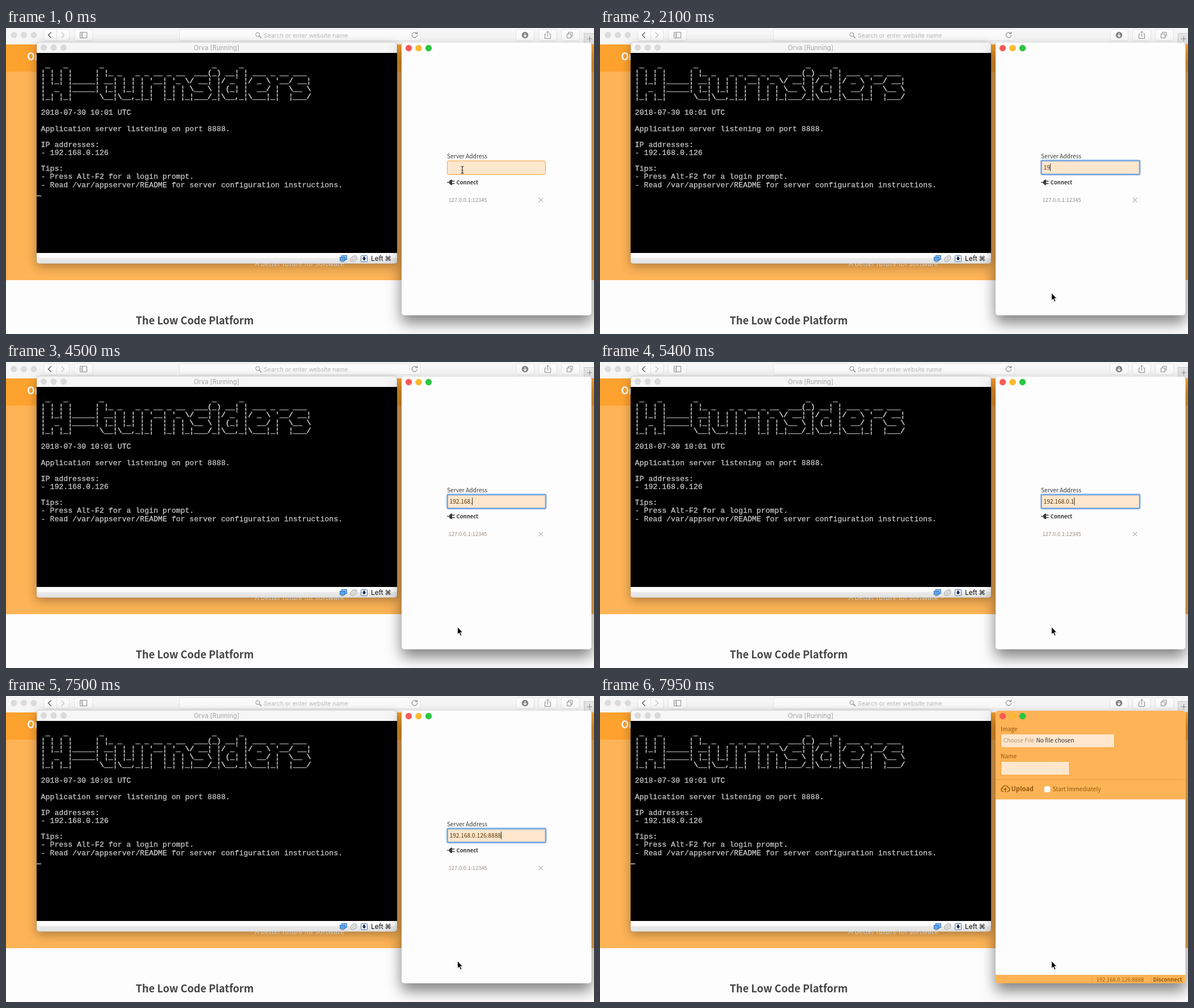
Write an HTML page that moves like this. It is 1036 px wide and 540 px high and loops after 8 s.

```html
<!DOCTYPE html>
<html lang="en">
<head>
<meta charset="utf-8">
<title>Connecting to the server</title>
<style>
html, body { margin: 0; width: 1036px; height: 540px; overflow: hidden; background: #fdfdfd; }
svg { display: block; }
text { white-space: pre; font: 10.2px "Noto Sans CJK JP", "Noto Sans CJK SC", "Noto Sans CJK", "Noto Sans", sans-serif; }
.ui { font-family: Inter, "Liberation Sans", sans-serif; }
.b { font-weight: bold; }
.s { font-size: 9.45px; }
#term text { font: 13.23px "Liberation Mono", monospace; fill: #c6c6c6; stroke: #c6c6c6; stroke-width: .3; }
#term .art { stroke-width: .6; }
.btn { fill: #fbfbfb; stroke: #e4e4e4; }
.ico { fill: none; stroke: #8a8a8a; stroke-width: 1; }
.field { fill: #fee7cd; stroke: #f8a534; }
.vm { filter: drop-shadow(0 5px 9px rgba(0,0,0,.32)); }
.app { filter: drop-shadow(0 13px 13px rgba(0,0,0,.5)); }
</style>
</head>
<body>
<svg width="1036" height="540" viewBox="0 0 1036 540">
  <defs>
    <linearGradient id="bar" x2="0" y2="1">
      <stop offset=".4" stop-color="#fdfdfd"/><stop offset=".55" stop-color="#e9e9e9"/><stop offset="1" stop-color="#e2e2e2"/>
    </linearGradient>
    <clipPath id="frame"><rect x="697" y="26" width="334.5" height="481" rx="5"/></clipPath>
  </defs>

  <!-- browser page -->
  <rect y="29" width="1036" height="416" fill="#fdb356"/>
  <rect y="29" width="1036" height="48" fill="#fda22e"/>
  <text class="b" x="37" y="57" fill="#fff" style="font-size:18px">Orva</text>
  <text x="438" y="420" fill="#fff" style="font-size:12.6px">A better future for software</text>
  <text class="b" x="228.5" y="522.5" fill="#444" style="font-size:18.2px">The Low Code Platform</text>

  <!-- browser toolbar -->
  <rect width="1036" height="29" fill="#f6f6f6"/>
  <g fill="#dcdcdc" stroke="#cfcfcf" stroke-width=".7">
    <circle cx="14" cy="12.5" r="5"/><circle cx="31.5" cy="12.5" r="5"/><circle cx="49" cy="12.5" r="5"/>
  </g>
  <g class="btn">
    <rect x="66.5" y="2.5" width="45" height="20" rx="3.5"/>
    <rect x="120.5" y="2.5" width="32" height="20" rx="3.5"/>
    <rect x="305.5" y="2.5" width="425" height="20" rx="3.5"/>
    <rect x="898.5" y="2.5" width="32" height="20" rx="3.5"/>
    <rect x="938.5" y="2.5" width="32" height="20" rx="3.5"/>
    <rect x="978.5" y="2.5" width="32" height="20" rx="3.5"/>
    <path d="M89.5 3V22"/>
  </g>
  <rect x="1018.5" y="9.5" width="18" height="19" fill="#e4e4e4" stroke="#cacaca"/>
  <g class="ico">
    <path d="M79.5 7.5l-5 5 5 5" stroke="#555" stroke-width="1.4"/>
    <path d="M97.5 7.5l5 5-5 5" stroke="#c4c4c4" stroke-width="1.4"/>
    <path d="M130.5 7.5h12v10h-12zM134.5 7.5v10M132 10h1.5M132 12h1.5M132 14h1.5"/>
    <circle cx="443.5" cy="11.5" r="3.5"/><path d="M446 14l4 4" stroke-width="1.4"/>
    <path d="M723.5 9.500a4.600 4.600 0 1 0 1 3M724.500 6.500v3.500h-3.500" stroke="#666"/>
    <path d="M951.500 10.500h-2v8h10v-8h-2M954.500 15V6M951.700 8.500l2.800-2.800 2.800 2.800"/>
    <path d="M988.500 10.500h7v7h-7zM991 10.500v-3h7v7h-2.500"/>
    <path d="M1024 19h9M1028.500 14.500v9"/>
  </g>
  <circle cx="914.5" cy="12.5" r="5.8" fill="#848484"/>
  <path d="M914.5 9v6M912 12.800l2.500 2.700 2.500-2.700" fill="none" stroke="#fff" stroke-width="1.3"/>
  <text class="ui" x="454" y="16.8" fill="#b8b8b8" style="font-size:10.5px">Search or enter website name</text>

  <!-- virtual machine window -->
  <rect class="vm" x="54" y="25" width="635" height="390.5" rx="5" fill="#f6f6f6" stroke="#000" stroke-opacity=".15"/>
  <g fill="#dadada" stroke="#cecece" stroke-width=".7">
    <circle cx="66.5" cy="34.5" r="5"/><circle cx="84" cy="34.5" r="5"/><circle cx="101.5" cy="34.5" r="5"/>
  </g>
  <text class="ui" x="371" y="38.5" text-anchor="middle" fill="#a4a4a4" style="font-size:11.2px">Orva [Running]</text>
  <path d="M54 397h635v13.500q0 5-5 5H59q-5 0-5-5z" fill="url(#bar)"/>
  <g>
    <rect x="591.5" y="401.5" width="9" height="7" fill="#8fc4f5" stroke="#2f6fb4"/>
    <rect x="588.5" y="404.5" width="9" height="6" fill="#5da5ea" stroke="#2f6fb4"/>
    <path d="M590 412.500h6" stroke="#2f6fb4"/>
    <ellipse cx="612.5" cy="407" rx="6.5" ry="4.3" transform="rotate(-38 612.5 407)" fill="#e0e0e0" stroke="#a8a8a8"/>
    <path d="M609 410l7-6" stroke="#b9b9b9"/>
    <rect x="625.5" y="401.5" width="11" height="11" rx="1" fill="#e8f0fa" stroke="#53779f"/>
    <path d="M629.500 403.500h3v3h2l-3.500 4-3.500-4h2z" fill="#10243f"/>
  </g>
  <text class="ui" x="643" y="411.3" fill="#111" style="font-size:12px">Left</text>
  <text x="667.5" y="411.3" fill="#111" style="font:11.5px 'DejaVu Sans',sans-serif">⌘</text>
  <rect x="54" y="44" width="635" height="353" fill="#000"/>
  <g id="term"></g>
  <rect id="block" x="54" y="295.5" width="8" height="1.5" fill="#c4c4c4"/>

  <!-- client window -->
  <rect class="app" x="697" y="26" width="334.5" height="481" rx="5" fill="#fdfdfd"/>

  <g id="login" fill="#3a3a3a">
    <text x="777" y="229.5">Server Address</text>
    <rect class="field" x="777.5" y="234.5" width="173" height="24" rx="2"/>
    <rect id="ring" x="777.5" y="234" width="173.5" height="24.5" rx="2" fill="none" stroke="#76a7e4"/>
    <text id="entry" x="781.5" y="249.8" fill="#5a3408"></text>
    <rect id="caret" y="239.5" width="1" height="13" fill="#222"/>
    <path d="M777 271.800h3.500q1.500-4.300 5.500-4.300v2h4.500v1.600H786v2.600h4.500v1.600H786v2q-4 0-5.500-4.300H777z"/>
    <text class="b s" x="793.5" y="276.2">Connect</text>
    <text class="s" x="779.5" y="307" fill="#978c80">127.0.0.1:12345</text>
    <path d="M938.800 299.800l7.400 7.400m0-7.400l-7.400 7.400" stroke="#bdb8b2" stroke-width="1.3"/>
  </g>

  <g id="upload" fill="#94590c">
    <g clip-path="url(#frame)">
      <rect x="697" y="26" width="335" height="156.5" fill="#fdb356"/>
      <rect x="697" y="492" width="335" height="15" fill="#fdb356"/>
      <path d="M697 147.500h335M866.500 492v15M970.500 492v15" stroke="#f0a03c"/>
    </g>
    <text x="706" y="62">Image</text>
    <rect class="field" x="706.5" y="67" width="200" height="24" rx="1.5"/>
    <text x="710.5" y="82.3" fill="#b0936f">Choose File</text>
    <text x="768.5" y="82.3" fill="#333">No file chosen</text>
    <text x="706" y="110.3">Name</text>
    <rect class="field" x="706.5" y="115.5" width="120.5" height="24" rx="1.5"/>
    <path d="M711 168.500h-1a3.200 3.200 0 0 1-.6-6.300 4.600 4.600 0 0 1 8.800-1.200 3.800 3.800 0 0 1 .5 7.500h-1.500M714 170v-6.500M711.500 165.500l2.500-2.500 2.500 2.500" fill="none" stroke="#94590c" stroke-width="1.4"/>
    <text class="b" x="724.5" y="168.3" style="font-size:11.1px">Upload</text>
    <rect x="782.5" y="159" width="11" height="11" rx="2.5" fill="#fff" stroke="#e2ba83" stroke-width=".7"/>
    <text x="797.5" y="168">Start Immediately</text>
    <text class="s" x="874.5" y="503.5">192.168.0.126:8888</text>
    <text class="b s" x="974.5" y="503.5">Disconnect</text>
  </g>

  <g stroke-width=".5">
    <circle cx="709.5" cy="35.5" r="5.4" fill="#fc5b57" stroke="#e2463f"/>
    <circle cx="727" cy="35.5" r="5.4" fill="#fdbc2e" stroke="#e0a028"/>
    <circle cx="744.5" cy="35.5" r="5.4" fill="#28c840" stroke="#1dac2b"/>
  </g>

  <path id="beam" d="M801.500 244q2 0 2.500 1.500.500-1.500 2.500-1.500M804 245.500v9.500M801.500 256.500q2 0 2.500-1.500.500 1.500 2.500 1.500M802.500 251.500h3" fill="none" stroke="#222" stroke-width="1.1"/>
  <path id="arrow" d="M0 0v13.300l3-2.800 2.300 5.300 2.200-1-2.300-5.100H9.200z" fill="#000" stroke="#fff" stroke-width=".9"/>
</svg>
<script>
const $ = id => document.getElementById(id);
const LOOP = 8000, STEP = 150, ROW = 14.12;

// Terminal rows, counted from the top of the black area.
const rows = {
  1: " _   _       _                        _     _",
  2: "| | | |     | |_ _   _ _ __ _ __  ___(_) __| | ___ _ __ ___",
  3: "| |_| |_____| __| | | | '__| '_ \\/ __| |/ _` |/ _ \\ '__/ __|",
  4: "|  _  |_____| |_| |_| | |  | | | \\__ \\ | (_| |  __/ |  \\__ \\",
  5: "|_| |_|      \\__|\\__,_|_|  |_| |_|___/_|\\__,_|\\___|_|  |___/",
  7: "2018-07-30 10:01 UTC",
  9: "Application server listening on port 8888.",
  11: "IP addresses:",
  12: "- 192.168.0.126",
  14: "Tips:",
  15: "- Press Alt-F2 for a login prompt.",
  16: "- Read /var/appserver/README for server configuration instructions."
};
for (const [row, line] of Object.entries(rows)) {
  const el = document.createElementNS("http://www.w3.org/2000/svg", "text");
  el.setAttribute("x", 61.6);
  el.setAttribute("y", 44 + ROW * row + 10.6);
  if (row < 6) el.setAttribute("class", "art");
  el.textContent = line.replaceAll("|", "¦");
  $("term").append(el);
}

const address = "192.168.0.126:8888";
// Step at which each character is typed.
const keys = [13, 14, 16, 18, 22, 25, 26, 30, 33, 35, 36, 37, 38, 42, 44, 45, 46, 47];
// Lengths of the alternating on and off phases of the terminal cursor.
const blink = [..."22212222222222221212222222221"].map(Number);
const caretOff = k => k < 1 || (k > 2 && k < 6) || (k > 9 && k < 13) || k === 49;
const SWITCH = 51, MOVE = 6, MOVE_STEPS = 6;

const show = (id, on) => $(id).setAttribute("visibility", on ? "visible" : "hidden");
const ease = p => p * p * (3 - 2 * p);

function blockOn(k) {
  let i = 0;
  while (i < blink.length - 1 && k >= blink[i]) k -= blink[i++];
  return i % 2 === 0;
}

function draw(k) {
  const login = k < SWITCH;
  show("block", blockOn(k));
  show("login", login);
  show("upload", !login);

  show("ring", login && k >= 1);
  $("ring").setAttribute("stroke-width", k === 1 ? 5 : 2.8);
  $("ring").setAttribute("stroke-opacity", k === 1 ? .5 : .95);

  const text = address.slice(0, keys.filter(s => s <= k).length);
  $("entry").textContent = text;
  const width = text ? $("entry").getComputedTextLength() : 0;
  $("caret").setAttribute("x", 781.5 + width);
  show("caret", login && !caretOff(k));

  const p = ease(Math.min(1, Math.max(0, (k - MOVE + 1) / MOVE_STEPS)));
  show("beam", k < MOVE);
  show("arrow", k >= MOVE);
  $("arrow").setAttribute("transform", `translate(${804 - 8.5 * p} ${250 + 217.5 * p})`);
}

const start = performance.now();
let last = -1;
function tick(now) {
  const k = Math.floor(Math.max(0, now - start) % LOOP / STEP);
  if (k !== last) draw(last = k);
  requestAnimationFrame(tick);
}
draw(0);
requestAnimationFrame(tick);
</script>
</body>
</html>
```
